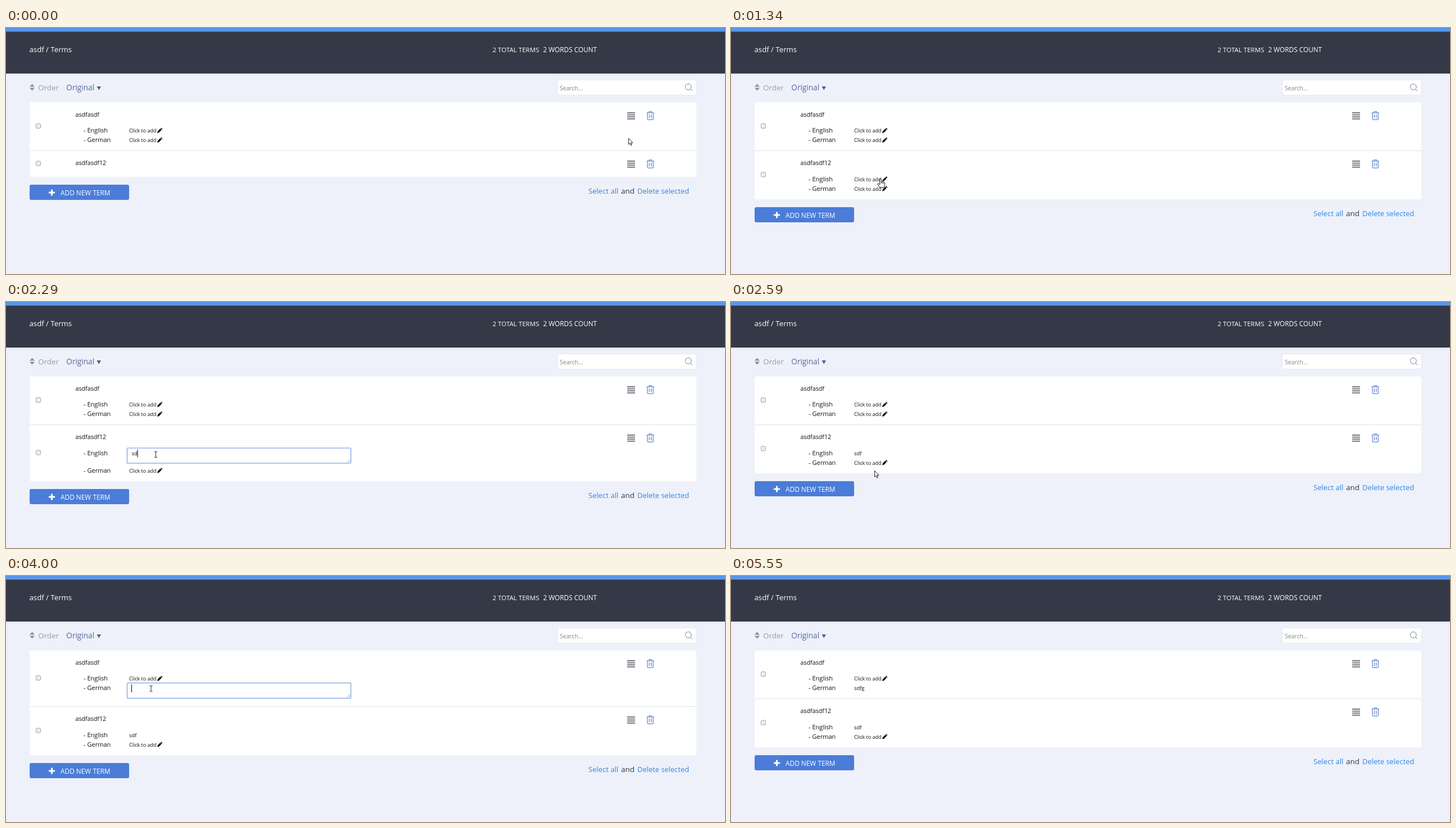
An HTML page with a canvas that plays this animation: 1279 px wide and 438 px high, repeating every 6.13 s.

```html
<!DOCTYPE html>
<html lang="en">
<head>
<meta charset="utf-8">
<title>Terms</title>
<style>
  html, body { margin: 0; width: 100%; height: 100%; overflow: hidden; background: #eef1f9; }
  canvas { display: block; }
</style>
</head>
<body>
<canvas id="stage" width="1279" height="438"></canvas>
<script>
const ctx = document.getElementById('stage').getContext('2d');
const LOOP = 6130;

// Screen updates come in bursts: [first ms, last ms, count]
const bursts = [[150, 300, 2], [600, 1610, 8], [2020, 2990, 8], [3140, 4150, 8], [4300, 5250, 8], [5400, 5550, 2]];
const steps = [0, ...bursts.flatMap(([a, b, n]) =>
  Array.from({ length: n }, (_, i) => a + (b - a) * i / (n - 1)))];

// Pointer path: [step, x, y]
const path = [
  [0, 1107, 196], [2, 1108, 245.5], [4, 1108, 245.5], [8, 266, 268], [9, 266.5, 271.5],
  [13, 266.5, 271.5], [15, 255, 300], [18, 258, 296], [21, 259, 228], [22, 258, 199],
  [28, 258, 203], [30, 423.5, 314], [32, 444, 320], [33, 545, 347], [34, 662, 378], [35, 863, 421]
];

const within = (k, a, b) => k >= a && k <= b;

function pointerAt(k) {
  const i = Math.max(1, path.findIndex(p => p[0] >= k));
  const [a, x0, y0] = path[i - 1], [b, x1, y1] = path[i];
  const u = (k - a) / (b - a);
  return [x0 + (x1 - x0) * u, y0 + (y1 - y0) * u];
}

function rect(x, y, w, h, fill, r = 0, stroke) {
  ctx.beginPath();
  ctx.roundRect(x, y, w, h, r);
  if (fill) { ctx.fillStyle = fill; ctx.fill(); }
  if (stroke) { ctx.strokeStyle = stroke; ctx.lineWidth = 1; ctx.stroke(); }
}

function text(str, x, y, size, color = '#111') {
  ctx.font = `${size}px "Open Sans", "Noto Sans", sans-serif`;
  ctx.fillStyle = color;
  ctx.fillText(str, x, y);
  return ctx.measureText(str).width;
}

function shape(d, x, y, fill, stroke, width = 1) {
  const p = new Path2D(d);
  ctx.save();
  ctx.translate(x, y);
  ctx.lineWidth = width;
  ctx.lineJoin = 'round';
  if (fill) { ctx.fillStyle = fill; ctx.fill(p); }
  if (stroke) { ctx.strokeStyle = stroke; ctx.stroke(p); }
  ctx.restore();
}

function header() {
  rect(0, 0, 1279, 438, '#eef1f9');
  ctx.save();
  ctx.shadowColor = 'rgba(40,45,65,.3)';
  ctx.shadowBlur = 3;
  rect(0, 6, 1279, 75, '#353846');
  ctx.restore();
  rect(0, 0, 1279, 6.5, '#5596ec');
  text('asdf / Terms', 41.5, 43, 13.2, '#fff');
  text('2 TOTAL TERMS', 865.5, 43, 11.55, '#fff');
  text('2 WORDS COUNT', 955.5, 43, 11.8, '#fff');

  shape('M0 5L4.5 0L9 5ZM0 7L4.5 12L9 7Z', 42, 99.5, '#8390ab');
  text('Order', 57.3, 110.5, 13.3, '#909db6');
  text('Original', 107.3, 110.5, 13.6, '#566996');
  shape('M0 0H7.5L3.75 6.5Z', 161.5, 104, '#4d618f');

  rect(981, 92.5, 247, 27, '#fff', 3, '#e4e8f0');
  text('Search...', 985, 110.5, 10.5, '#858585');
  shape('M5.3 0A5.3 5.3 0 1 1 5.29 0M9.2 9.2L12.5 12.5', 1208.5, 99.5, null, '#72777f');
}

function pencil(x, y) {
  shape('M0 9L.7 6L5.4 1.3L7.7 3.6L3 8.3ZM6 .7L6.8 0Q7.2-.3 7.6 0L9 1.4Q9.3 1.8 9 2.2L8.3 3Z', x, y, '#000');
}

function editor(y, value) {
  rect(215.5, y - 8.5, 398, 27, '#fff', 0, '#5f90da');
  shape('M0 6L6 0M3.5 6L6 3.5', 606.5, y + 11, null, '#888', .8);
  const w = text(value, 223.5, y + 4.5, 9.7);
  rect(223 + w, y - 6, 1, 14, '#000');
}

function translation(name, value, y, editing) {
  text('- ' + name, 138, y + 4, 11.05);
  if (editing) return editor(y, value);
  text(value || 'Click to add', 219, y + 4, value ? 9.3 : 9);
  if (!value) pencil(269, y - 4);
}

function row(term, y, height, hover) {
  rect(53.5, y + height / 2 - 4.5, 8, 8, '#eee', 1.5, '#a3a3a3');
  text(term, 123.5, y + 26, 10.7);
  for (let i = 0; i < 4; i++) rect(1105, y + 18 + i * 3.6, 14, 2, hover ? '#1a2278' : '#747780');
  shape('M0 3H13.5M4.5 3V.7H9V3M1.7 3V14Q1.7 15.2 3 15.2H10.5Q11.8 15.2 11.8 14V3M5 6V12.3M8.5 6V12.3',
    1139.5, y + 16, null, '#7c98d6', 1.5);
}

function footer(y) {
  rect(42, y + 14, 177, 27, '#4b7cd8', 3);
  rect(76, y + 26.5, 11, 3, '#fff', .5);
  rect(80, y + 22.5, 3, 11, '#fff', .5);
  text('ADD NEW TERM', 97, y + 32.5, 11.85, '#fff');
  text('Select all', 1036, y + 30, 13.1, '#2d86e6');
  text('and', 1094, y + 30, 13.5, '#343846');
  text('Delete selected', 1123, y + 30, 12.95, '#2d86e6');
}

function pointer(k) {
  if (k > 35) return;
  const [x, y] = pointerAt(k);
  if (within(k, 2, 4) || k === 8 || k === 22) {
    shape('M-1.3 1Q0-.7 1.3 1V6Q2.7 5 3.6 6.4Q5 5.6 5.7 7Q7.5 6.6 7.5 8.5V11.5Q7 14 6 16H-1.5' +
      'Q-3 13-5 10.5Q-5.6 8.5-3.6 9L-1.3 11Z', x, y, '#fff', '#111');
    shape('M1.3 6V9M3.6 6.5V9M5.7 7.2V9', x, y, null, '#111', .8);
  } else if (within(k, 9, 13) || within(k, 23, 28)) {
    shape('M-2.5-5H-.5L0-4.5L.5-5H2.5M0-4.5V4.5M-2.5 5H-.5L0 4.5L.5 5H2.5', x, y, null, '#222');
  } else {
    shape('M.5 .5V11.3L3 9L4.7 13L6.4 12.2L4.7 8.4H8Z', x, y, '#fff', '#222');
  }
}

function draw(k) {
  const edit1 = within(k, 23, 30), edit2 = within(k, 9, 14), open2 = k >= 3;
  const english = 'sdf'.slice(0, Math.max(0, k - 10));
  const german = 'sdfg'.slice(0, Math.max(0, k - 26));
  const h1 = edit1 ? 100 : 86;
  const h2 = edit2 ? 101 : open2 ? 87 : 47;
  const y1 = 132, y2 = y1 + h1;

  header();
  rect(42, y1 + .5, 1186, h1 + h2 - .5, '#fff', 3);
  rect(42, y2, 1186, 1, '#e0e2e7');

  row('asdfasdf', y1, h1);
  translation('English', '', y1 + 50);
  translation('German', german, y1 + 67, edit1);

  row('asdfasdf12', y2, h2, within(k, 2, 4));
  if (open2) {
    translation('English', english, y2 + 50.5, edit2);
    translation('German', '', y2 + (edit2 ? 81.5 : 67.5));
  }
  footer(y2 + h2);
  pointer(k);
}

const start = performance.now();
function tick() {
  const t = (performance.now() - start) % LOOP;
  draw(steps.filter(s => s <= t).length - 1);
  requestAnimationFrame(tick);
}
tick();
</script>
</body>
</html>
```
